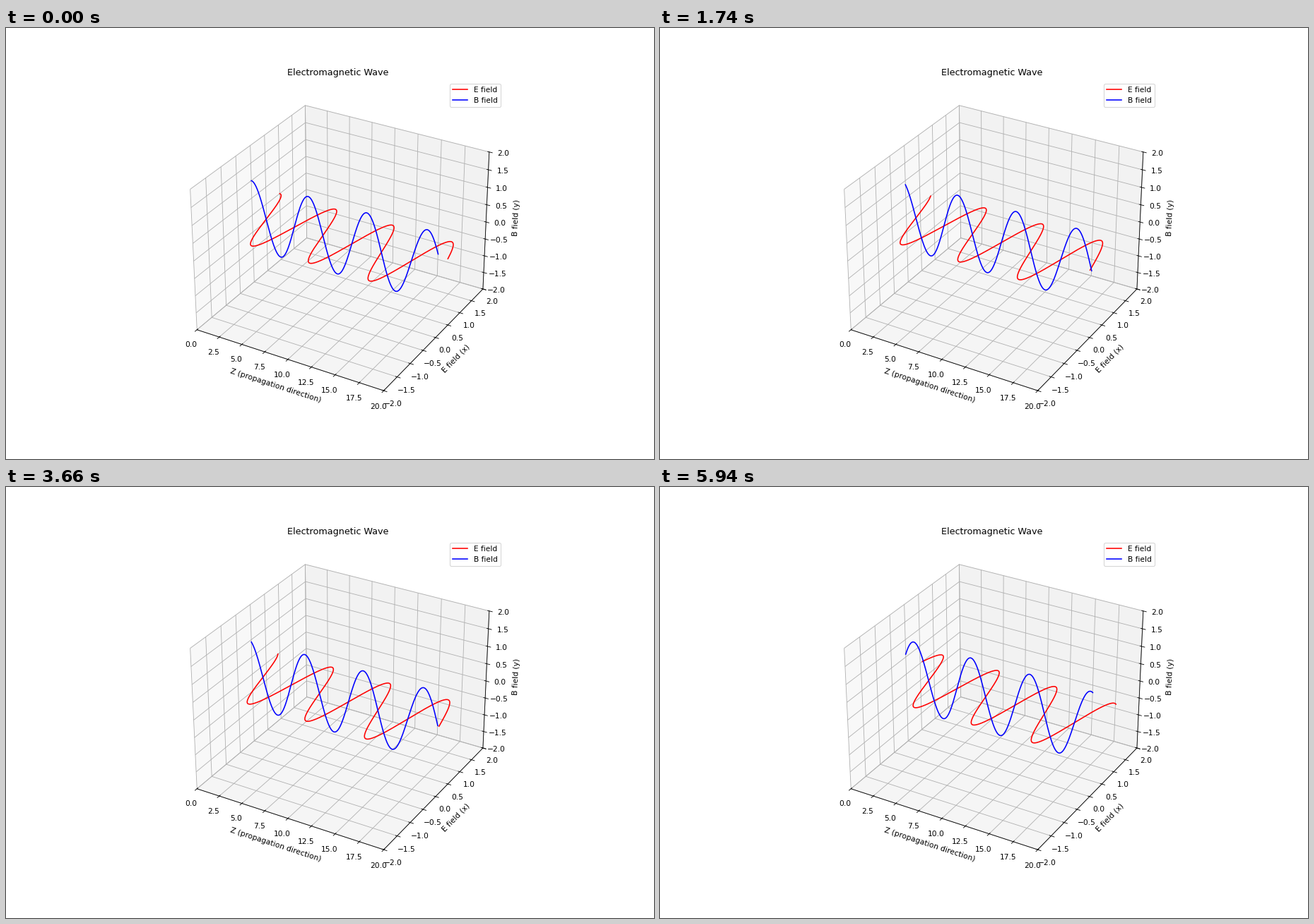
Animation, 917 px wide and 611 px high, one loop 6 s. Source, as a matplotlib script:

```python
import numpy as np
import matplotlib.pyplot as plt
from matplotlib.animation import FuncAnimation

DPI = 76.375
FRAMES = 100
INTERVAL = 60
PHASE_STEP = 0.2  # radians per frame

# 917 x 611 pixels
fig = plt.figure(figsize=(12.00655, 8), dpi=DPI)
ax = fig.add_subplot(projection="3d")

ax.set_xlim(0, 20)
ax.set_ylim(-2, 2)
ax.set_zlim(-2, 2)
ax.set_xlabel("Z (propagation direction)")
ax.set_ylabel("E field (x)")
ax.set_zlabel("B field (y)")
ax.set_title("Electromagnetic Wave")

z = np.linspace(0, 20, 500)
zero = np.zeros_like(z)
e_line, = ax.plot(z, np.cos(z), zero, "r", label="E field")
b_line, = ax.plot(z, zero, np.cos(z), "b", label="B field")
ax.legend(loc="upper right")


def update(frame):
    wave = np.cos(z - PHASE_STEP * frame)
    e_line.set_data_3d(z, wave, zero)
    b_line.set_data_3d(z, zero, wave)
    return e_line, b_line


anim = FuncAnimation(fig, update, frames=FRAMES, interval=INTERVAL,
                     repeat=True, repeat_delay=0, blit=False)
plt.show()
```
